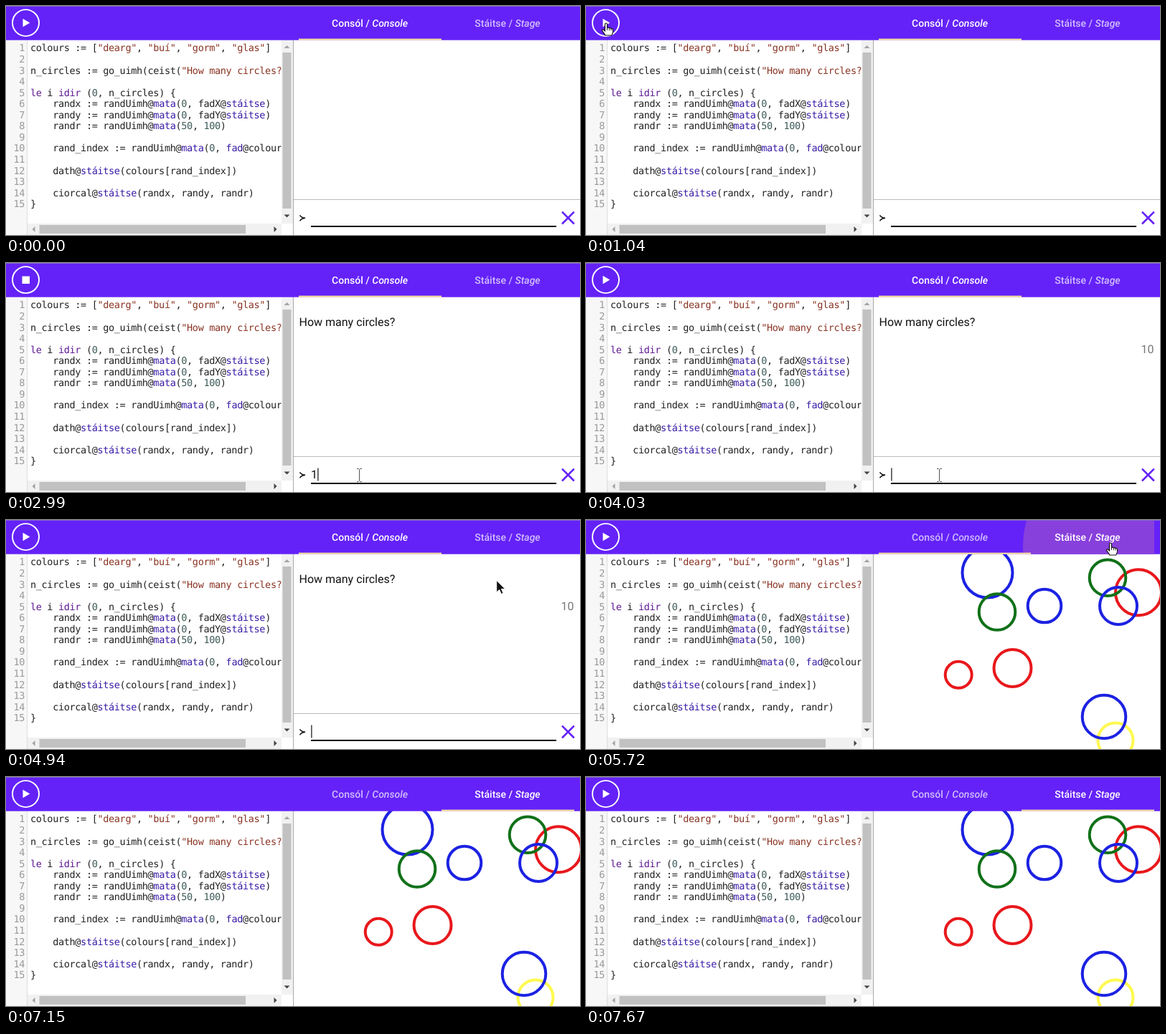
An HTML page that plays this animation: 800 px wide and 320 px high, repeating every 7800 ms.

```html
<!DOCTYPE html>
<html lang="ga">
<head>
<meta charset="utf-8">
<title>Circles</title>
<style>
html, body { margin: 0; width: 100%; height: 100%; overflow: hidden; background: #fff; }
svg { display: block; width: 800px; height: 320px; }
text { white-space: pre; text-rendering: geometricPrecision; }
#code text { font: 13.5px "DejaVu Sans Mono", monospace; letter-spacing: -.34px; fill: #222; }
#code .num { fill: #999; text-anchor: end; }
#code .str { fill: #8a3423; }
#code .kw { fill: #5f1a94; }
#code .lit { fill: #3c5a58; }
#code .fn { fill: #3a1ba6; }
.tab { font: 500 14px Roboto, sans-serif; fill: #fff; text-anchor: middle; }
.it { font-style: italic; }
.out { font: 16px Roboto, sans-serif; fill: #111; }
</style>
</head>
<body>
<svg viewBox="0 0 800 320">
  <defs>
    <clipPath id="codeClip"><rect x="0" y="48" width="383.5" height="256"/></clipPath>
    <clipPath id="stageClip"><rect x="401" y="47" width="399" height="273"/></clipPath>
    <clipPath id="tabClip"><rect x="607" y="1" width="185" height="46.700"/></clipPath>
  </defs>
  <rect width="800" height="320" fill="#fff"/>

  <!-- editor -->
  <rect y="47" width="29" height="273" fill="#f7f7f7"/>
  <rect x="29" y="47" width="1" height="273" fill="#ddd"/>
  <g id="code" clip-path="url(#codeClip)"></g>
  <rect x="384" y="47" width="16" height="257" fill="#f1f1f1"/>
  <rect x="30" y="304" width="354" height="16" fill="#f1f1f1"/>
  <rect x="385.500" y="65" width="12" height="218" fill="#c1c1c1"/>
  <rect x="46.500" y="306" width="287.500" height="12" fill="#c1c1c1"/>
  <path d="M387.5 59L391.5 55L395.5 59ZM40.5 308L36.5 312L40.5 316Z" fill="#a3a3a3"/>
  <path d="M387.5 291.500L391.500 295.500L395.500 291.500ZM373.500 308L377.500 312L373.500 316Z" fill="#444"/>

  <!-- console -->
  <g id="console">
    <text id="ask" class="out" x="408.500" y="87.600">How many circles?</text>
    <text id="reply" class="out" x="791.500" y="125.500" text-anchor="end" style="fill:#777">10</text>
    <rect x="401" y="270" width="399" height="1" fill="#bbb"/>
    <path d="M409.500 292.300Q411.500 295.800 417 296.300Q411.500 296.800 409.500 300.300" fill="none" stroke="#111" stroke-width="1.500"/>
    <text id="typed" class="out" x="425" y="301"></text>
    <rect id="caret" y="286.500" width="1.200" height="18" fill="#111"/>
    <rect x="425" y="307" width="342" height="2" fill="#000"/>
    <path d="M775 287.700L791.800 304.500M791.800 287.700L775 304.500" stroke="#6422f8" stroke-width="2.600"/>
  </g>
  <g id="stage" clip-path="url(#stageClip)" fill="none" stroke-width="4"></g>
  <rect x="400" y="47" width="1" height="273" fill="#aaa"/>

  <!-- header -->
  <rect width="800" height="47.700" fill="#6422f8"/>
  <rect width="800" height="1" fill="#8468d0"/>
  <g clip-path="url(#tabClip)"><circle id="ripple" cx="732" cy="36" fill="#8840dc"/></g>
  <circle cx="27.500" cy="23.600" r="18.500" fill="none" stroke="#fff" stroke-width="1.950"/>
  <path id="play" d="M23.500 17.800L33.300 23.500L23.500 29.200Z" fill="#fff"/>
  <rect id="stop" x="22.500" y="18.500" width="10.500" height="10.500" fill="#fff"/>
  <text id="tab1" class="tab" x="507" y="29">Consól / <tspan class="it">Console</tspan></text>
  <text id="tab2" class="tab" x="699" y="29">Stáitse / <tspan class="it">Stage</tspan></text>
  <rect id="bar" y="45.700" height="2" fill="#ffeb9c"/>

  <!-- pointers, hotspot at 0,0 -->
  <g id="arrow"><path d="M0 0V16.500L3.900 13L6.600 19L9.300 17.800L6.700 12H12Z" fill="#111" stroke="#fff"/></g>
  <g id="beam"><path d="M-3.500 -9H-1L0 -8L1 -9H3.500M-3.500 9H-1L0 8L1 9H3.500M0 -8V8" fill="none" stroke="#555"/></g>
  <g id="hand"><path d="M-1.500 1Q0 -1 1.500 1V6.500Q3 5.500 4.300 7Q6 6 7 7.600Q9.200 7 9.500 9.200V12Q9.200 14.500 7.800 17H-1.200Q-2.500 14 -5.600 10.300Q-5.200 8 -3 9.500L-1.500 11Z" fill="#fff" stroke="#111" stroke-width="1.100"/><path d="M1.500 6.500V10M4.300 7.500V10.300M7 8V10.500" stroke="#111" stroke-width=".9"/></g>
</svg>
<script>
const LOOP = 7800, STEP = 130;
const $ = id => document.getElementById(id);

function make(tag, parent, attrs, text) {
  const el = document.createElementNS("http://www.w3.org/2000/svg", tag);
  for (const k in attrs) el.setAttribute(k, attrs[k]);
  if (text) el.textContent = text;
  return parent.appendChild(el);
}
const set = (id, attrs) => { for (const k in attrs) $(id).setAttribute(k, attrs[k]); };
const show = (id, on) => { $(id).style.display = on ? "" : "none"; };

const source = `colours := ["dearg", "buí", "gorm", "glas"]

n_circles := go_uimh(ceist("How many circles?"))

le i idir (0, n_circles) {
    randx := randUimh@mata(0, fadX@stáitse)
    randy := randUimh@mata(0, fadY@stáitse)
    randr := randUimh@mata(50, 100)

    rand_index := randUimh@mata(0, fad@colours)

    dath@stáitse(colours[rand_index])

    ciorcal@stáitse(randx, randy, randr)
}`;
const token = /(?<str>"[^"]*")|(?<kw>^le\b|idir)|(?<lit>\d+)|(?<fn>mata|stáitse|fad(?=@))/g;

source.split("\n").forEach((line, i) => {
  const y = 63.4 + 15.565 * i;
  make("text", $("code"), { x: 26, y, class: "num" }, String(i + 1));
  const row = make("text", $("code"), { x: 34, y });
  let end = 0;
  for (const m of line.matchAll(token)) {
    row.append(line.slice(end, m.index));
    const cls = Object.keys(m.groups).find(k => m.groups[k]);
    make("tspan", row, { class: cls }, m[0]);
    end = m.index + m[0].length;
  }
  row.append(line.slice(end));
});

const ink = { dearg: "#e8181c", buí: "#fff94f", gorm: "#1c22e2", glas: "#117119" };
const circles = [
  ["buí", 738, 308, 24.5], ["gorm", 559.5, 73.5, 35], ["glas", 573, 128.5, 25.3],
  ["gorm", 639, 120, 23.3], ["dearg", 519.2, 216.3, 18.5], ["dearg", 594.5, 207, 26],
  ["dearg", 770, 101.3, 32], ["glas", 727, 80.7, 25.3], ["gorm", 742, 120, 26],
  ["gorm", 722, 275, 30.3]
];
for (const [c, cx, cy, r] of circles) make("circle", $("stage"), { cx, cy, r, stroke: ink[c] });

// time, then values; eased between rows
const path = [
  [390, 70, -24], [910, 28, 24], [1170, 28, 24], [1950, 462, 219], [2340, 492.5, 296.5],
  [4290, 492.5, 296.5], [5200, 731, 32], [6630, 731, 32], [7150, 712, -24]
];
const barMove = [[5590, 408, 607], [5720, 408, 620], [5850, 520, 785], [5980, 607, 792]];
const rippleMove = [[5590, 0, 1], [5720, 123, 1], [5850, 190, 1], [6240, 190, 0]];

function at(rows, t) {
  const i = rows.findIndex(r => r[0] > t);
  if (i === 0) return rows[0].slice(1);
  if (i < 0) return rows[rows.length - 1].slice(1);
  const a = rows[i - 1], b = rows[i];
  const u = (t - a[0]) / (b[0] - a[0]), e = u * u * (3 - 2 * u);
  return a.slice(1).map((v, k) => v + (b[k + 1] - v) * e);
}

function pointer(x, y) {
  if (y < 48) return x < 48 || (x > 607 && x < 792) ? "hand" : "arrow";
  if (y > 280 && x > 425 && x < 767) return "beam";
  return x > 30 && x < 384 && y < 304 ? "beam" : "arrow";
}

const RUN = 1170, FOCUS = 2470, KEY1 = 2860, KEY2 = 3120, ENTER = 3640, SWITCH = 5720;

function draw(t) {
  const running = t >= RUN && t < ENTER, staged = t >= SWITCH;
  show("play", !running);
  show("stop", running);
  show("console", !staged);
  show("stage", staged);
  show("ask", t >= RUN + STEP);
  show("reply", t >= ENTER);
  $("tab1").style.opacity = staged ? 0.7 : 1;
  $("tab2").style.opacity = staged ? 1 : 0.7;

  const typed = t < KEY1 || t >= ENTER ? "" : t < KEY2 ? "1" : "10";
  $("typed").textContent = typed;
  const last = [ENTER, KEY2, KEY1, FOCUS].find(k => t >= k);
  show("caret", last && (t - last) % 1060 < 530);
  set("caret", { x: 425.3 + 9 * typed.length });

  const [left, right] = at(barMove, t);
  set("bar", { x: left, width: right - left });
  const [r, opacity] = at(rippleMove, t);
  set("ripple", { r, opacity });

  const [x, y] = at(path, t), kind = pointer(x, y);
  for (const id of ["arrow", "beam", "hand"]) show(id, id === kind);
  set(kind, { transform: `translate(${x.toFixed(1)} ${y.toFixed(1)})` });
}

const start = performance.now();
function tick() {
  const t = (performance.now() - start) % LOOP;
  draw(Math.floor(t / STEP) * STEP);
  requestAnimationFrame(tick);
}
tick();
</script>
</body>
</html>
```
